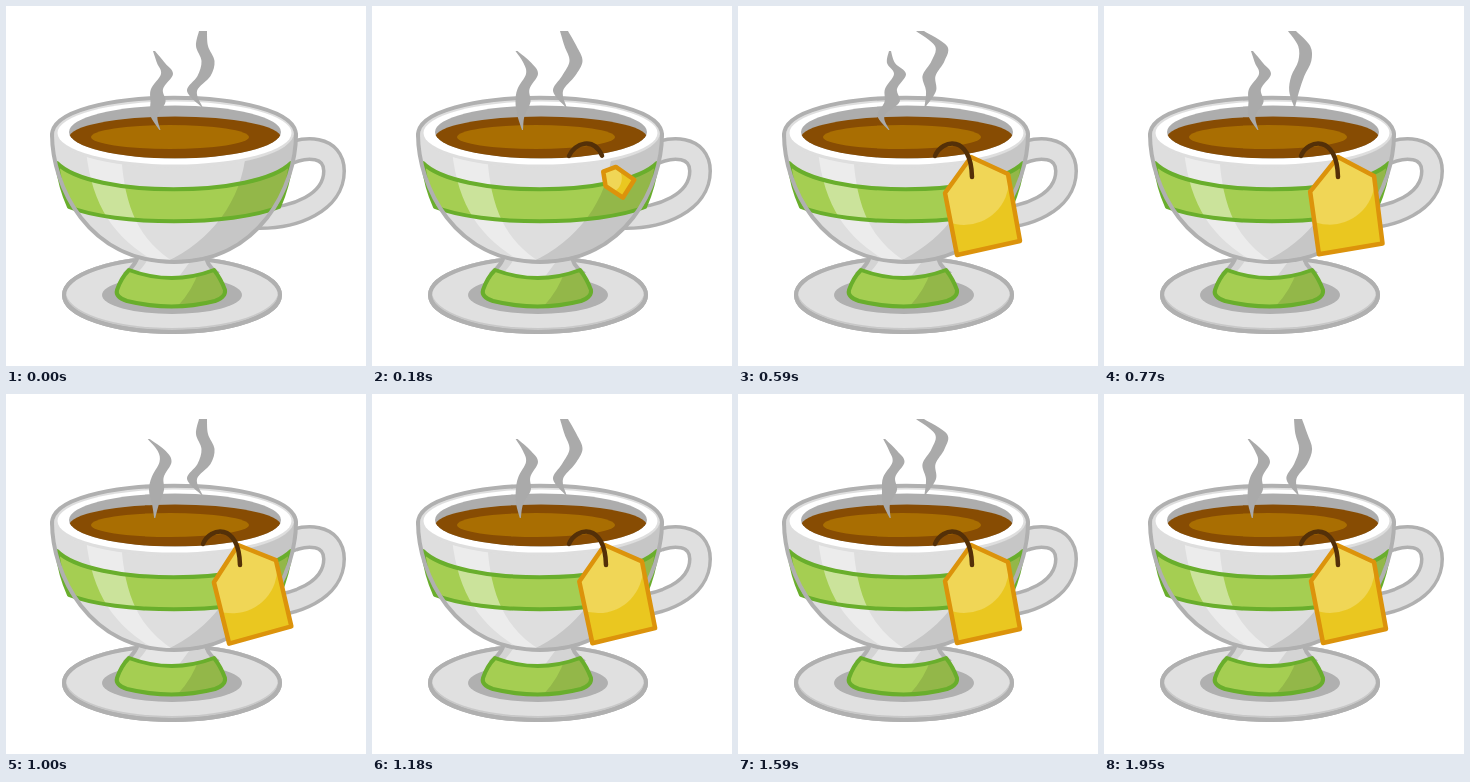
Recreate the animation shown at these times as an HTML page. Size 360x360 px, loop 1990 ms.

```html
<!DOCTYPE html>
<html>
<head>
<meta charset="utf-8">
<style>
html, body { margin: 0; width: 100%; height: 100%; overflow: hidden; background: #fff }
svg { display: block; width: 100vw; height: 100vh }
.line { stroke: #b0b0b0; stroke-width: 4 }
.green { fill: #a5ce52 }
.edge { stroke: #69ae2c; stroke-width: 4; stroke-linejoin: round }
.light { fill: #fff; opacity: .42 }
.shade { fill: #000; opacity: .11 }
</style>
</head>
<body>
<svg viewBox="0 0 360 360" fill="none" stroke-linecap="round">
  <defs>
    <path id="bowl" d="M46 128C46 180 82 256 168 256S290 180 290 128"/>
    <path id="band" d="M51 157C85 192 250 192 285 157Q282 180 273 201C226 220 110 220 63 201Q54 181 51 157Z"/>
    <path id="foot" d="M123 264Q166 280 208 264Q215 273 219 284Q220 291 209 295Q166 306 121 295Q109 291 111 284Q115 272 123 264Z"/>
    <path id="handle" d="M276 151C300 138 328 140 328 165C328 196 290 213 250 212"/>
    <path id="label" d="M233 151L270 168L282 235L219 249L207 187Z"/>
    <clipPath id="inBowl"><use href="#bowl"/></clipPath>
    <clipPath id="inFoot"><use href="#foot"/></clipPath>
    <clipPath id="inMouth"><ellipse cx="169" cy="126" rx="106" ry="26.5"/></clipPath>
    <clipPath id="inLabel"><use href="#label"/></clipPath>
  </defs>

  <!-- saucer -->
  <ellipse cx="166" cy="289" rx="108" ry="37" fill="#c8c8c8" class="line"/>
  <ellipse cx="166" cy="286" rx="106" ry="36" fill="#e0e0e0"/>
  <ellipse cx="166" cy="289" rx="108" ry="37" class="line"/>
  <ellipse cx="166" cy="289" rx="70" ry="19" fill="#b0b0b0"/>

  <!-- foot -->
  <path d="M132 250Q130 258 121 266Q166 284 210 266Q200 258 200 250Z" fill="#d4d4d4" class="line"/>
  <path d="M142 253Q136 263 130 268Q158 275 172 272L186 253Z" fill="#e6e6e6"/>
  <use href="#foot" class="green"/>
  <path class="shade" clip-path="url(#inFoot)" d="M194 260Q188 285 166 306H230V260Z"/>
  <use href="#foot" class="edge"/>

  <!-- handle and bowl -->
  <use href="#handle" stroke="#b0b0b0" stroke-width="24"/>
  <use href="#handle" stroke="#dfdfdf" stroke-width="17"/>
  <use href="#bowl" fill="#dedede"/>
  <use href="#band" class="green"/>
  <g clip-path="url(#inBowl)">
    <path class="light" d="M80 145C86 200 108 232 150 256H168C135 235 118 205 115 145Z"/>
    <path class="shade" d="M240 145C236 195 205 235 160 256H290V128Z"/>
  </g>
  <use href="#band" class="edge"/>
  <use href="#bowl" class="line"/>

  <!-- rim and tea -->
  <ellipse cx="168" cy="127" rx="120" ry="35" fill="#dedede"/>
  <path d="M46 130C43 79 293 79 290 130" class="line"/>
  <ellipse cx="168.5" cy="127" rx="117" ry="31.5" fill="#fff"/>
  <g clip-path="url(#inMouth)">
    <path d="M50 90H280V160H50Z" fill="#adadad"/>
    <ellipse cx="169" cy="131.5" rx="106" ry="21" fill="#874c03"/>
    <ellipse cx="164" cy="131" rx="79" ry="12" fill="#a96e02"/>
  </g>

  <path id="steam" fill="#aaa"/>
  <g id="tag">
    <use href="#label" fill="#eac720"/>
    <circle cx="226" cy="174" r="45" fill="#f0d656" clip-path="url(#inLabel)"/>
    <path d="M233 151L270 168L282 235L219 249L207 187Z" vector-effect="non-scaling-stroke"
      stroke="#dc930b" stroke-width="4.5" stroke-linejoin="round"/>
  </g>
  <path id="string" d="M197 150C204 133 233 128 234 171" pathLength="1" stroke="#543008" stroke-width="4.5"/>
</svg>
<script>
const $ = id => document.getElementById(id);
const LOOP = 1990, SHORT = [6, 11, 18];
const starts = [0];
for (let i = 0; i < 23; i++) starts.push(starts[i] + (SHORT.includes(i) ? 50 : 90));

// each wisp bends between three poses, given as centre x at each height
const wisps = [
  { y: [45, 57, 68, 83, 96, 110, 124], half: [1, 4, 6, 6, 7.5, 3.5, .5], times: [0, 4, 7, 9],
    poses: [[148, 155, 161, 151, 152, 148, 154],
            [141, 156, 159, 152, 150, 150, 147],
            [152, 153, 162, 153, 154, 143, 151]] },
  { y: [25, 40, 55, 70, 85, 101], half: [4, 6, 6.5, 6.5, 5, .5], times: [0, 4, 7, 12],
    poses: [[197, 196, 202, 198, 186, 196],
            [187, 201, 206, 195, 186, 192],
            [182, 203, 200, 191, 193, 187]] }
];

// linear interpolation through [step, value] pairs
function track(k, keys) {
  for (let i = 1; i < keys.length; i++) {
    const [a, u] = keys[i - 1], [b, v] = keys[i];
    if (k <= b) return u + (v - u) * (k - a) / (b - a);
  }
  return keys[keys.length - 1][1];
}

// Catmull-Rom spline as cubic segments
function spline(p) {
  const at = i => p[Math.max(0, Math.min(p.length - 1, i))];
  let d = p[0].join(' ');
  for (let i = 1; i < p.length; i++) {
    const ctrl = (j, sign) => at(j).map((v, n) => v + sign * (at(j + 1)[n] - at(j - 1)[n]) / 6).join(' ');
    d += `C${ctrl(i - 1, 1)} ${ctrl(i, -1)} ${p[i].join(' ')}`;
  }
  return d;
}

function ribbon({ y, half, times, poses }, k) {
  const step = k % times[3];
  const mid = y.map((_, i) => track(step, times.map((t, n) => [t, poses[n % 3][i]])));
  const side = sign => y.map((v, i) => [mid[i] + sign * half[i], v]);
  return `M${spline(side(-1))}L${spline(side(1).reverse())}Z`;
}

function draw(now) {
  const t = now % LOOP;
  const k = starts.filter(s => s <= t).length - 1;
  $('steam').setAttribute('d', wisps.map(w => ribbon(w, k)).join(''));

  const turn = track(k, [[0, -63], [4, -27], [7, 0], [9, 3], [12, -3], [15, 0]]);
  const size = track(k, [[0, 0], [4, .66], [6, 1]]);
  $('tag').setAttribute('transform',
    `translate(${233 + 4 * (1 - size)} 170) rotate(${turn}) scale(${size}) translate(-233 -170)`);
  $('string').style.display = $('tag').style.display = k ? '' : 'none';
  $('string').setAttribute('stroke-dasharray', `${Math.min(1, k / 3)} 2`);
  requestAnimationFrame(draw);
}
draw(performance.now());
</script>
</body>
</html>
```
